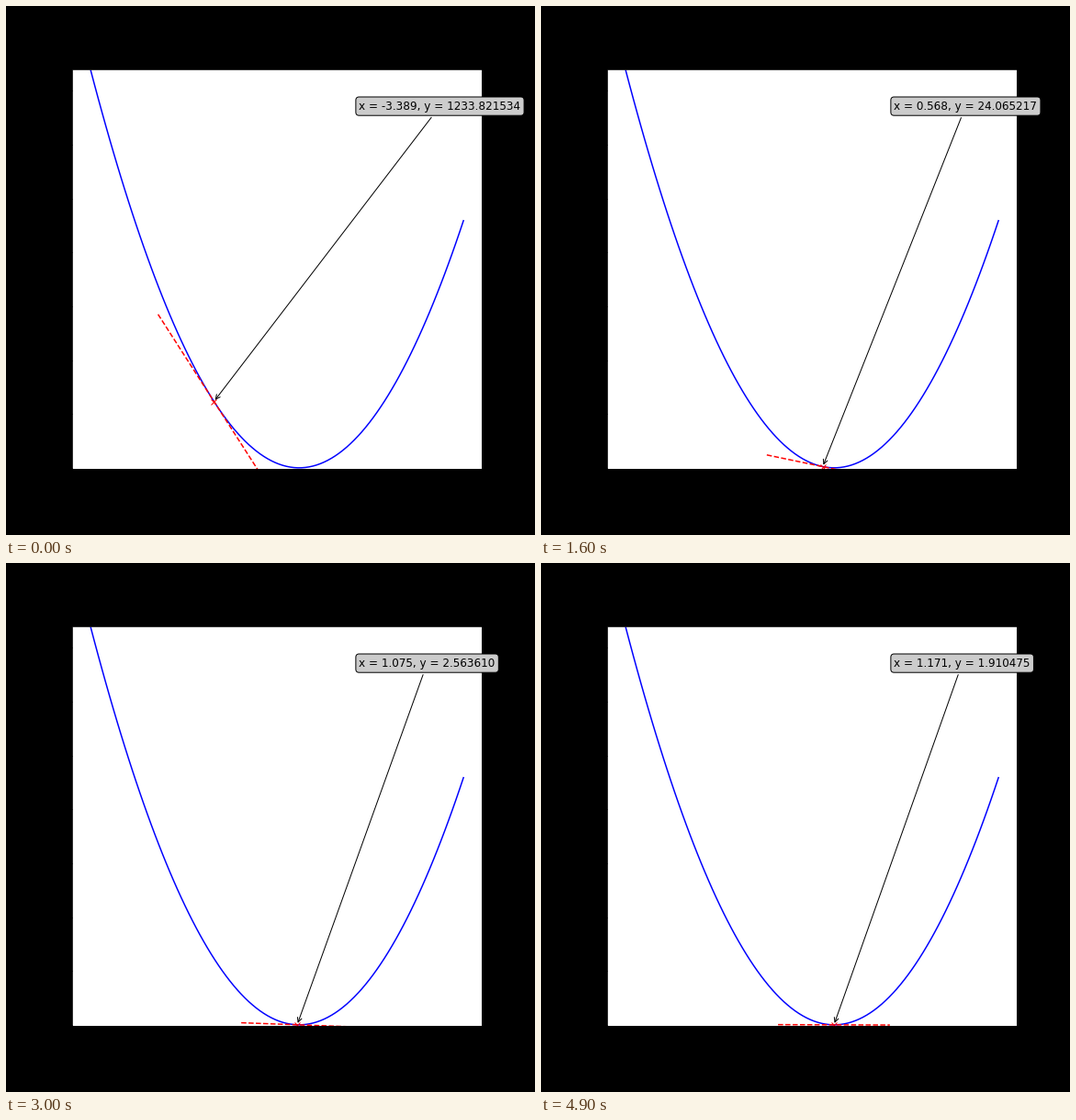
A matplotlib script that plays this animation: 576 px wide and 576 px high, repeating every 5000 ms.

```python
import numpy as np
import matplotlib.pyplot as plt
from matplotlib.animation import FuncAnimation

FRAMES, INTERVAL = 50, 100
START, RATE = -4.0, 0.001
HALF_SPAN = 3.0

plt.rcParams["font.family"] = "DejaVu Sans"


def loss(x):
    return 59 * x**2 - 418 / 3 * x + 505 / 6


def slope(x):
    return 118 * x - 418 / 3


def descend(steps):
    x = START
    for _ in range(steps):
        x -= RATE * slope(x)
    return x


fig = plt.figure(figsize=(8, 8), dpi=72, facecolor="black")
fig.subplots_adjust(left=0.125, right=0.9, bottom=0.125, top=0.88)
ax = fig.add_subplot()
ax.tick_params(labelbottom=False, labelleft=False)

xs = np.linspace(-10, 10, 100)
ys = loss(xs)
ax.plot(xs, ys, color="blue")
ax.set_xlim(-11, 11)
ax.set_ylim(ys.min() - 20, ys.max() + 20)

tangent, = ax.plot([], [], "r--")
point, = ax.plot([], [], "rx")
note = ax.annotate(
    "", xy=(0, 0), xytext=(0.7, 0.9), textcoords="axes fraction", fontsize=12,
    bbox=dict(boxstyle="round", fc="0.8"), arrowprops=dict(arrowstyle="->"),
)


def update(frame):
    x = descend(frame + 1)
    y = loss(x)
    ends = np.array([x - HALF_SPAN, x + HALF_SPAN])
    tangent.set_data(ends, y + slope(x) * (ends - x))
    point.set_data([x], [y])
    note.xy = (x, y)
    note.set_text(f"x = {x:.3f}, y = {y:.6f}")
    return tangent, point, note


anim = FuncAnimation(fig, update, frames=FRAMES, interval=INTERVAL,
                     repeat=True, repeat_delay=0)
plt.show()
```
